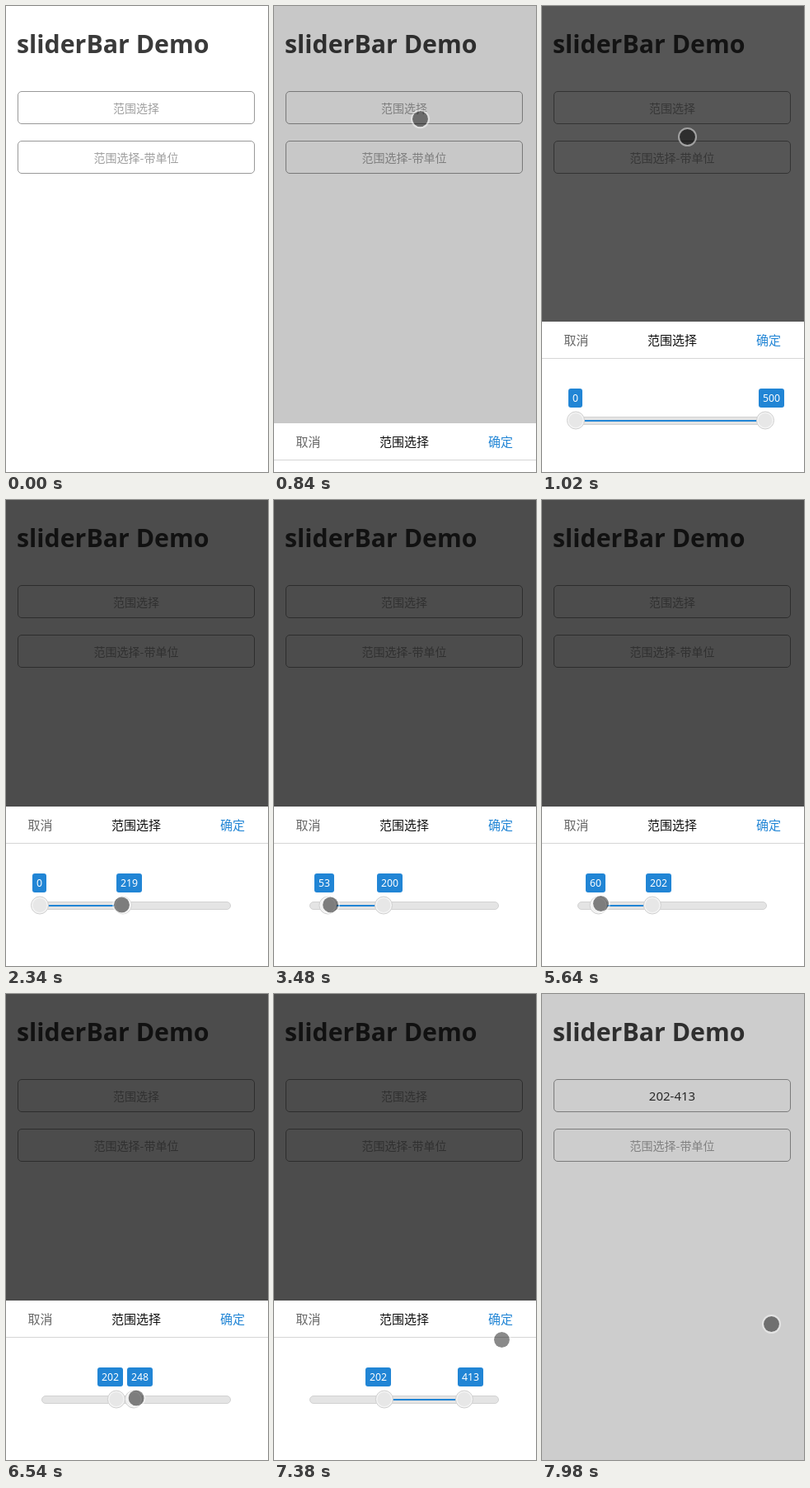
Recreate the animation shown at these times as an HTML page. Size 318 by 564 pixels, loop 8 s.

```html
<!DOCTYPE html>
<html lang="zh-CN">
<head>
<meta charset="utf-8">
<title>sliderBar Demo</title>
<style>
  html, body { margin: 0; width: 100%; height: 100%; overflow: hidden; background: #fff; }
  svg { display: block; width: 318px; height: 564px; font: 14px "Noto Sans", "Noto Sans CJK SC", "Noto Sans CJK", sans-serif; }
  .cjk { font-family: "Noto Sans CJK SC", "Noto Sans CJK", sans-serif; }
  .mid { text-anchor: middle; }
  .field { fill: #fff; stroke: #999; }
  .hint { fill: #a0a0a0; }
  .value { fill: #333; font-size: 15px; }
  .head { font-size: 15px; }
  .tag rect { fill: #2185d5; }
  .tag text { fill: #fff; font-size: 12.3px; }
</style>
</head>
<body>
<svg viewBox="0 0 318 564">
  <rect width="318" height="564" fill="#fff"/>
  <text x="13" y="57" font-size="30.3" font-weight="700" fill="#3a3a3a">sliderBar Demo</text>
  <rect class="field" x="14.5" y="103.5" width="287" height="39" rx="4.5"/>
  <rect class="field" x="14.5" y="163.5" width="287" height="39" rx="4.5"/>
  <text class="mid" id="range" x="158" y="129"></text>
  <text class="mid cjk hint" x="158" y="189">范围选择-带单位</text>
  <rect id="shade" width="318" height="564"/>

  <g id="panel">
    <rect y="371" width="318" height="193" fill="#fff"/>
    <path d="M0 415.5H318" stroke="#d6d6d6"/>
    <g class="mid cjk head">
      <text x="41.5" y="399" fill="#666">取消</text>
      <text x="158" y="399" fill="#111">范围选择</text>
      <text x="275" y="399" fill="#2185d5">确定</text>
    </g>
    <rect x="43.5" y="486.5" width="229" height="9" rx="4.5" fill="#e4e4e4" stroke="#d2d2d2"/>
    <rect id="span" y="490" height="2" fill="#2185d5"/>
    <g id="slots"></g>
  </g>

  <g id="pointer">
    <circle r="9.5" fill="#000" fill-opacity=".46"/>
    <circle r="10.5" fill="none" stroke="#fff" stroke-opacity=".45" stroke-width="2"/>
  </g>
</svg>
<script>
const LOOP = 8000, STEP = 60, OPEN = 790, CLOSE = 7800, PANEL_HEIGHT = 193;
const $ = id => document.getElementById(id);
const clamp = v => Math.min(1, Math.max(0, v));
const easeOut = v => 1 - (1 - clamp(v)) ** 2;

// rows of [time, x, y]
const pointerPath = [
  [120, 309, 41], [300, 228, 94], [540, 178, 132], [720, 178, 132],
  [1020, 176.5, 158.5], [1380, 223, 431], [1440, 233, 451], [1500, 246, 479],
  [1800, 261, 487], [1920, 261, 487], [2340, 140.5, 490], [2760, 72, 490],
  [3120, 44, 490], [3240, 44, 490], [4080, 197, 489], [4440, 228, 486],
  [4920, 168, 488], [5640, 71.5, 488.5], [5700, 71, 489], [6600, 166, 489],
  [7020, 234, 485], [7140, 234, 485], [7380, 276.5, 418.5], [7620, 278.5, 399.5]
];
// rows of [time, value]
const firstDrag = [[1920, 500], [2340, 219], [2400, 200]];
const secondDrag = [
  [3240, 0], [4080, 330], [4440, 397], [4920, 267],
  [5640, 60], [5700, 58], [6600, 265], [7020, 413]
];

// Monotone cubic interpolation of column c
function sample(keys, t, c = 1) {
  const last = keys.length - 1;
  if (t <= keys[0][0]) return keys[0][c];
  if (t >= keys[last][0]) return keys[last][c];
  const i = keys.findIndex(k => k[0] > t) - 1;
  const slope = j => j < 0 || j >= last ? 0 : (keys[j + 1][c] - keys[j][c]) / (keys[j + 1][0] - keys[j][0]);
  const tangent = j => {
    const a = slope(j - 1), b = slope(j);
    return a * b <= 0 ? 0 : 2 * a * b / (a + b);
  };
  const h = keys[i + 1][0] - keys[i][0], u = (t - keys[i][0]) / h;
  return keys[i][c] + (keys[i + 1][c] - keys[i][c]) * u * u * (3 - 2 * u)
    + h * u * (1 - u) * (tangent(i) * (1 - u) - tangent(i + 1) * u);
}

const knob = `<g class="knob">
  <circle r="10.5" fill="#f4f4f4" stroke="#cfcfcf"/><circle r="8.5" fill="#e7e7e7"/></g>`;
const tag = `<g class="tag"><rect y="452" height="23" rx="3"/><text class="mid" y="468"></text></g>`;
$("slots").innerHTML = (knob + tag).repeat(2);
const knobs = document.querySelectorAll(".knob"), tags = document.querySelectorAll(".tag");

const place = (el, x, y) => el.setAttribute("transform", `translate(${x} ${y})`);
const toX = value => 41 + value * 0.46;

function drawSlot(i, value) {
  const x = toX(value), label = String(Math.round(value)), width = 10 + 7 * label.length;
  const left = Math.round(i ? x - 8 : x + 8 - width);
  const [box, text] = tags[i].children;
  place(knobs[i], x, 490.5);
  box.setAttribute("x", left);
  box.setAttribute("width", width);
  text.setAttribute("x", left + width / 2);
  text.textContent = label;
}

function draw(t) {
  const resting = t < 5160 ? sample(firstDrag, t) : 202;
  const moving = sample(secondDrag, t);
  const low = Math.min(resting, moving), high = Math.max(resting, moving);
  drawSlot(0, low);
  drawSlot(1, high);
  $("span").setAttribute("x", toX(low));
  $("span").setAttribute("width", toX(high) - toX(low));

  const opened = easeOut((t - OPEN) / 300);
  const shown = opened - clamp((t - CLOSE) / 170);
  place($("panel"), 0, Math.round(PANEL_HEIGHT * (1 - shown)));
  $("panel").style.display = shown > 0 ? "" : "none";
  $("shade").setAttribute("opacity", 0.7 * (opened - clamp((t - CLOSE) / 250)));

  const chosen = t > CLOSE;
  $("range").textContent = chosen ? "202-413" : "范围选择";
  $("range").setAttribute("class", chosen ? "mid value" : "mid cjk hint");

  $("pointer").style.display = t < 120 ? "none" : "";
  place($("pointer"), sample(pointerPath, t), sample(pointerPath, t, 2));
}

const start = performance.now();
function tick() {
  const t = (performance.now() - start) % LOOP;
  draw(Math.floor(t / STEP) * STEP);
  requestAnimationFrame(tick);
}
tick();
</script>
</body>
</html>
```
